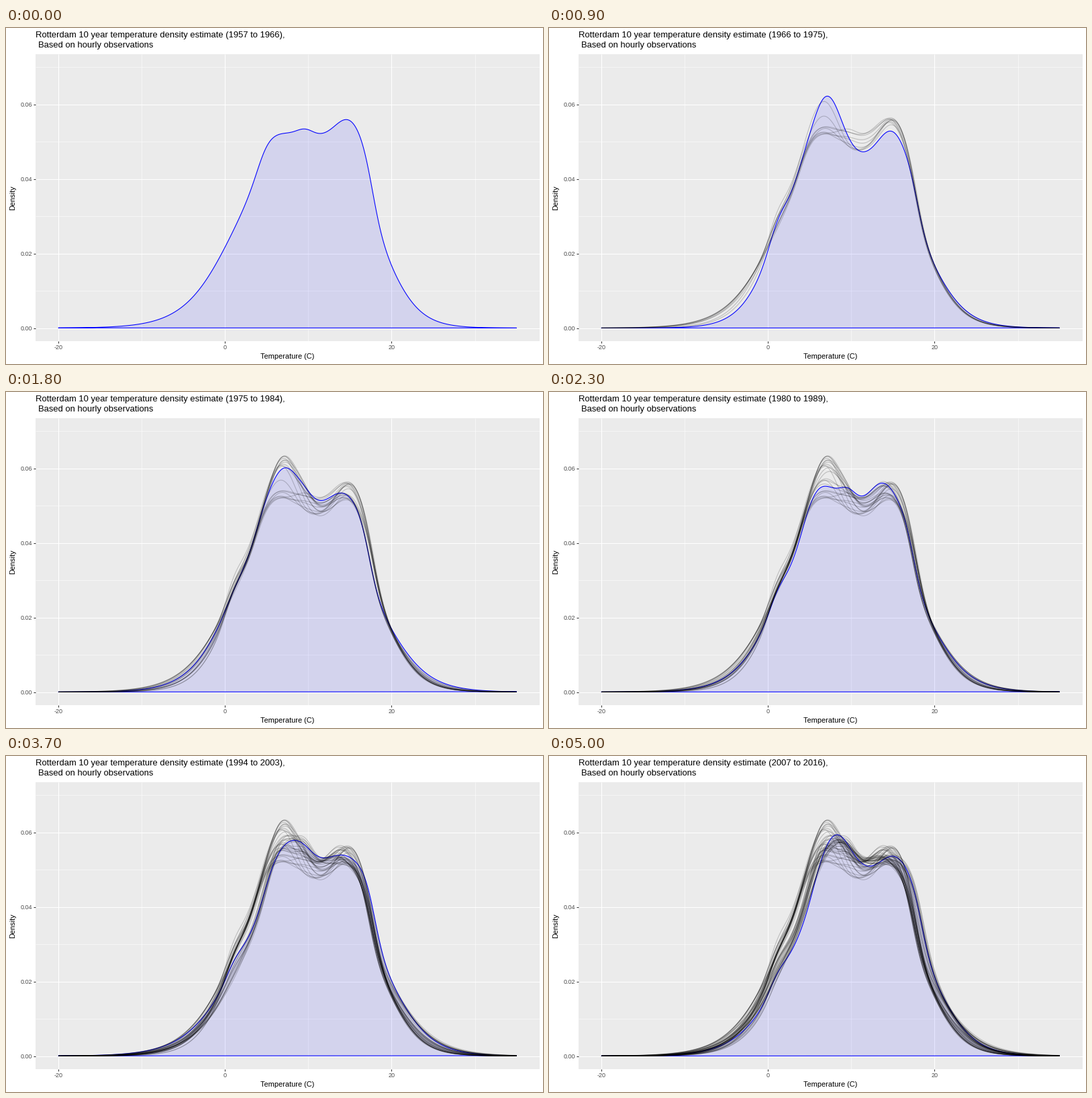
A matplotlib script for the animation above (5100 ms loop, 800x500 px).

```python
import numpy as np
import matplotlib.pyplot as plt
from matplotlib.animation import FuncAnimation
from matplotlib.collections import LineCollection
from matplotlib.patches import Polygon, Rectangle

W, H, DPI = 800, 500, 100
PX = 72 / DPI
FIRST, COUNT = 1957, 51
LEFT, RIGHT, TOP, BOTTOM = 44, 795, 38.5, 466
BASE = 446.5

plt.rcParams["font.family"] = "Liberation Sans"


def to_x(temp):
    return 326.2 + 12.41 * temp


def to_y(density):
    return BASE - 5550 * density


TEMPS = np.linspace(-20, 35, 400)
keys = {}


def key(year, level, cold, warm, shoulder, first, middle, second):
    """Plateau level, edges as (midpoint, spread), peaks as (place, size)."""
    keys[year] = [level, *cold, *warm, shoulder, *first, middle, *second]


key(1957, 285, (0.9, 2.9), (18.7, 2.05), 0, (6.6, 6), 10, (14.8, 28))
key(1963, 262, (0.4, 2.7), (18.8, 2.05), 14, (6.8, 36), 0, (14.7, 46))
key(1966, 255, (0.7, 2.05), (19.0, 2.2), 18, (7.1, 91), 0, (14.8, 40))
key(1970, 268, (0.9, 2.1), (18.55, 2.25), 12, (7.1, 84), 12, (14.4, 23))
key(1980, 277, (1.2, 2.6), (18.6, 2.45), 14, (6.5, 32), 20, (13.8, 35))
key(1988, 283, (1.9, 2.8), (18.75, 2.75), 0, (6.9, 47), 28, (13.2, 12))
key(2000, 287, (2.0, 2.4), (19.5, 2.25), 15, (8.5, 29), 0, (15.2, 14))
key(2007, 275, (2.2, 2.8), (19.5, 2.3), 12, (8.2, 56), 0, (15.1, 24))

# Yearly step of each value in the random walk between keys
STEPS = [3, 0.15, 0.12, 0.1, 0.1, 3, 0.15, 4, 4, 0.15, 4]


def sigmoid(u):
    return 1 / (1 + np.exp(-u))


def edge(u, outer, inner, turn):
    """Soft step with a wide foot that sharpens past the turn."""
    return sigmoid(u / (outer + (inner - outer) * sigmoid(u - turn)))


def bump(at, size, width):
    return size * np.exp(-0.5 * ((TEMPS - at) / width) ** 2)


def density_line(values):
    (level, cold, cold_w, warm, warm_w, shoulder,
     at1, size1, middle, at2, size2) = values
    height = level * edge(TEMPS - cold, cold_w, 1.1, 3) * edge(warm - TEMPS, warm_w, 0.85, 0)
    height += bump(1.1, shoulder, 1) + bump(at1, size1, 1.7)
    height += bump(9.6, middle, 1) + bump(at2, size2, 1.55)
    return np.column_stack([to_x(TEMPS), BASE - height])


def yearly_curves():
    years = np.arange(FIRST, FIRST + COUNT)
    marks = list(keys)
    rng = np.random.default_rng(11)
    columns = []
    for points, step in zip(zip(*keys.values()), STEPS):
        walk = np.cumsum(rng.normal(0, step, COUNT))
        walk -= np.interp(years, marks, walk[np.array(marks) - FIRST])
        columns.append(np.interp(years, marks, points) + walk)
    return [density_line(values) for values in zip(*columns)]


curves = yearly_curves()

fig = plt.figure(figsize=(W / DPI, H / DPI), dpi=DPI, facecolor="white")
ax = fig.add_axes([0, 0, 1, 1])
ax.set_xlim(0, W)
ax.set_ylim(H, 0)
ax.axis("off")


def line(xs, ys, color, width, z):
    ax.plot(xs, ys, color=color, lw=width * PX, zorder=z, solid_capstyle="butt")


def label(x, y, text, size, color="black", **kw):
    return ax.text(x, y, text, fontsize=size * PX, color=color,
                   va="baseline", **kw)


ax.add_patch(Rectangle((LEFT, TOP), RIGHT - LEFT, BOTTOM - TOP,
                       fc="#EBEBEB", ec="none", zorder=0))
for t in range(-20, 31, 10):
    line([to_x(t)] * 2, [TOP, BOTTOM], "white", 0.53 if t % 20 else 1.07, 1)
for k in range(8):
    y = to_y(k / 100)
    line([LEFT, RIGHT], [y, y], "white", 0.53 if k % 2 else 1.07, 1)

for t in (-20, 0, 20):
    line([to_x(t)] * 2, [BOTTOM, BOTTOM + 2.75], "#333333", 1.07, 2)
    label(to_x(t), 478, str(t), 9, "#4D4D4D", ha="center")
for k in (0, 2, 4, 6):
    y = to_y(k / 100)
    line([LEFT - 2.75, LEFT], [y, y], "#333333", 1.07, 2)
    label(39.2, y + 3.2, f"{k / 100:.2f}", 9, "#4D4D4D", ha="right")

label(419.5, 492, "Temperature (C)", 11, ha="center")
label(13, 252.5, "Density", 11, ha="center", rotation=90, rotation_mode="anchor")
title = label(44, 14, "", 13)
label(47.8, 29, "Based on hourly observations", 13)

area = Polygon(curves[0], closed=True, fc=(0, 0, 1, 0.1), ec="blue",
               lw=1.07 * PX, joinstyle="round", zorder=3)
ax.add_patch(area)
past = LineCollection([], colors=[(0, 0, 0, 0.2)], linewidths=1.07 * PX, zorder=4)
ax.add_collection(past, autolim=False)


def update(i):
    year = FIRST + i
    title.set_text("Rotterdam 10 year temperature density estimate "
                   f"({year} to {year + 9}),")
    area.set_xy(curves[i])
    past.set_segments(curves[:i])
    return title, area, past


anim = FuncAnimation(fig, update, frames=COUNT, init_func=lambda: update(0),
                     interval=100, repeat=True, repeat_delay=0)
plt.show()
```
